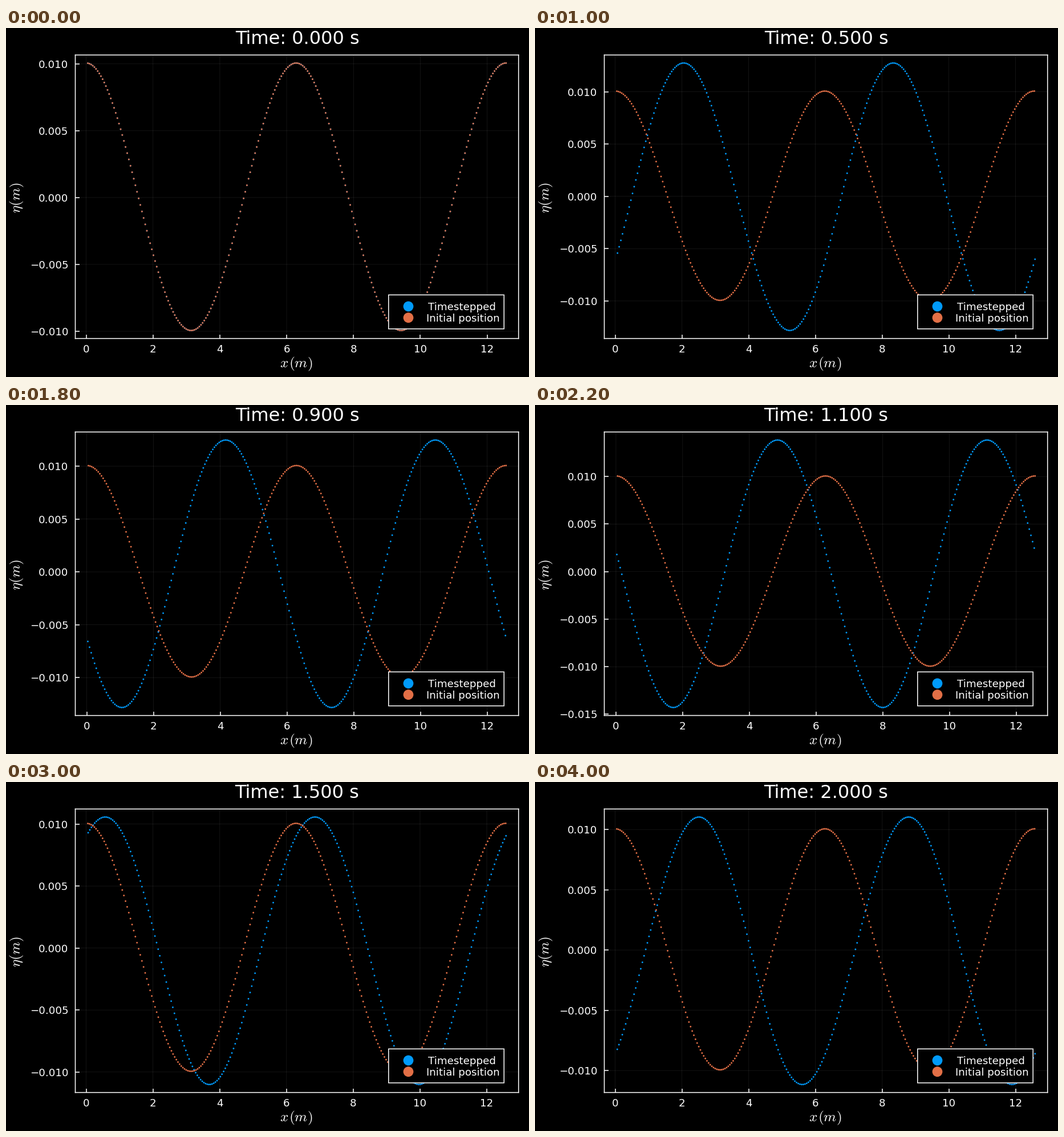
A matplotlib script that plays this animation: 917 by 611 pixels, repeating every 4200 ms.

```python
import numpy as np
import matplotlib.pyplot as plt
from matplotlib.animation import FuncAnimation
from matplotlib.patches import Rectangle
from matplotlib.ticker import FuncFormatter, MultipleLocator

W, H, DPI = 917, 611, 64
FRAMES, INTERVAL, DT = 21, 200, 0.1
BLUE, ORANGE = "#009AFA", "#E26F46"
LEFT, RIGHT, TOP, BOTTOM = 121.5, 898.7, 47.3, 543.6

OMEGA = 4.464                  # wave frequency
COS_AMP, SIN_AMP = 0.01, 0.0142
DEPTH_RATIO = 0.61             # vertical to horizontal excursion
BEAT = 2.45                    # beat of free and bound second harmonics
LABELS = 4 * np.pi * np.arange(1, 257) / 256

plt.rcParams.update({"font.family": "DejaVu Sans", "mathtext.fontset": "cm"})


def px(n):
    """Pixels to points."""
    return n * 72 / DPI


def surface(t):
    """Positions of the drifting surface particles at time t."""
    c, s = np.cos(OMEGA * t), np.sin(OMEGA * t)
    x = LABELS + (SIN_AMP * s * np.cos(LABELS)
                  + COS_AMP * (1 - c) * np.sin(LABELS)) / DEPTH_RATIO
    theta = x - np.arctan2(SIN_AMP * s, COS_AMP * c)
    amp = np.hypot(SIN_AMP * s, COS_AMP * c)
    even = -0.00009 + 0.00015 * np.cos(BEAT * t)
    odd = -0.00013 * np.sin(BEAT * t)
    eta = amp * np.cos(theta) + even * np.cos(2 * theta) + odd * np.sin(2 * theta)
    return x, eta


def padded(*arrays):
    """Common limits with a three percent margin."""
    low = min(a.min() for a in arrays)
    high = max(a.max() for a in arrays)
    margin = 0.03 * (high - low)
    return low - margin, high + margin


def dots(axes, x, y, color, diameter):
    """Discs at exact subpixel positions."""
    return axes.scatter(x, y, s=px(diameter) ** 2, c=color, edgecolors="none",
                        linewidths=0, snap=False, zorder=3)


fig = plt.figure(figsize=(W / DPI, H / DPI), dpi=DPI, facecolor="black")
ax = fig.add_axes([LEFT / W, 1 - BOTTOM / H, (RIGHT - LEFT) / W, (BOTTOM - TOP) / H],
                  facecolor="black")
ax.set_axisbelow(True)
ax.grid(color="white", alpha=0.1, linewidth=px(0.76), snap=False)
for spine in ax.spines.values():
    spine.set(color="white", linewidth=px(1.53), snap=False)
ax.tick_params(direction="in", color="white", labelcolor="white", length=px(7.5),
               width=px(1.53), labelsize=px(18.3))
ax.tick_params(axis="x", pad=px(10.5))
ax.tick_params(axis="y", pad=px(12))
ax.xaxis.set_major_locator(MultipleLocator(2))
ax.yaxis.set_major_locator(MultipleLocator(0.005))
ax.xaxis.set_major_formatter(FuncFormatter(lambda v, _: f"{v:.0f}"))
ax.yaxis.set_major_formatter(
    FuncFormatter(lambda v, _: f"{round(v, 3) + 0.0:.3f}".replace("-", "\u2212")))

start_x, start_eta = surface(0)
moving = dots(ax, start_x, start_eta, BLUE, 2.9)
dots(ax, start_x, start_eta, ORANGE, 2.9)

# Stage overlay in pixel coordinates
stage = fig.add_axes([0, 0, 1, 1], facecolor="none")
stage.axis("off")


def write(x, y, text, size, **kw):
    return stage.text(x, y, text, color="white", fontsize=px(size), **kw)


title = write(510.5, 28, "", 32, ha="center", va="baseline")
write(509, 588.5, "$x\\hspace{0.08}(m)$", 25.2, ha="center", va="center")
write(19.6, 297, "$\\eta(m)$", 25.2, ha="center", va="center", rotation=90)

stage.add_patch(Rectangle((670.8, 467.3), 202.4, 59.4, facecolor="black",
                          edgecolor="white", linewidth=px(1.53), snap=False))
for x, y, name, color in ((740, 487.4, "Timestepped", BLUE),
                          (737.2, 507.2, "Initial position", ORANGE)):
    dots(stage, [705.5], [y], color, 17.8)
    write(x, y + 6.8, name, 18.3, va="baseline")
stage.set(xlim=(0, W), ylim=(H, 0))


def update(frame):
    t = frame * DT
    x, eta = surface(t)
    moving.set_offsets(np.column_stack([x, eta]))
    ax.set(xlim=padded(x, start_x), ylim=padded(eta, start_eta))
    title.set_text(f"Time: {t:.3f} s")
    return moving, title


anim = FuncAnimation(fig, update, frames=FRAMES, interval=INTERVAL,
                     repeat=True, repeat_delay=0)
plt.show()
```
